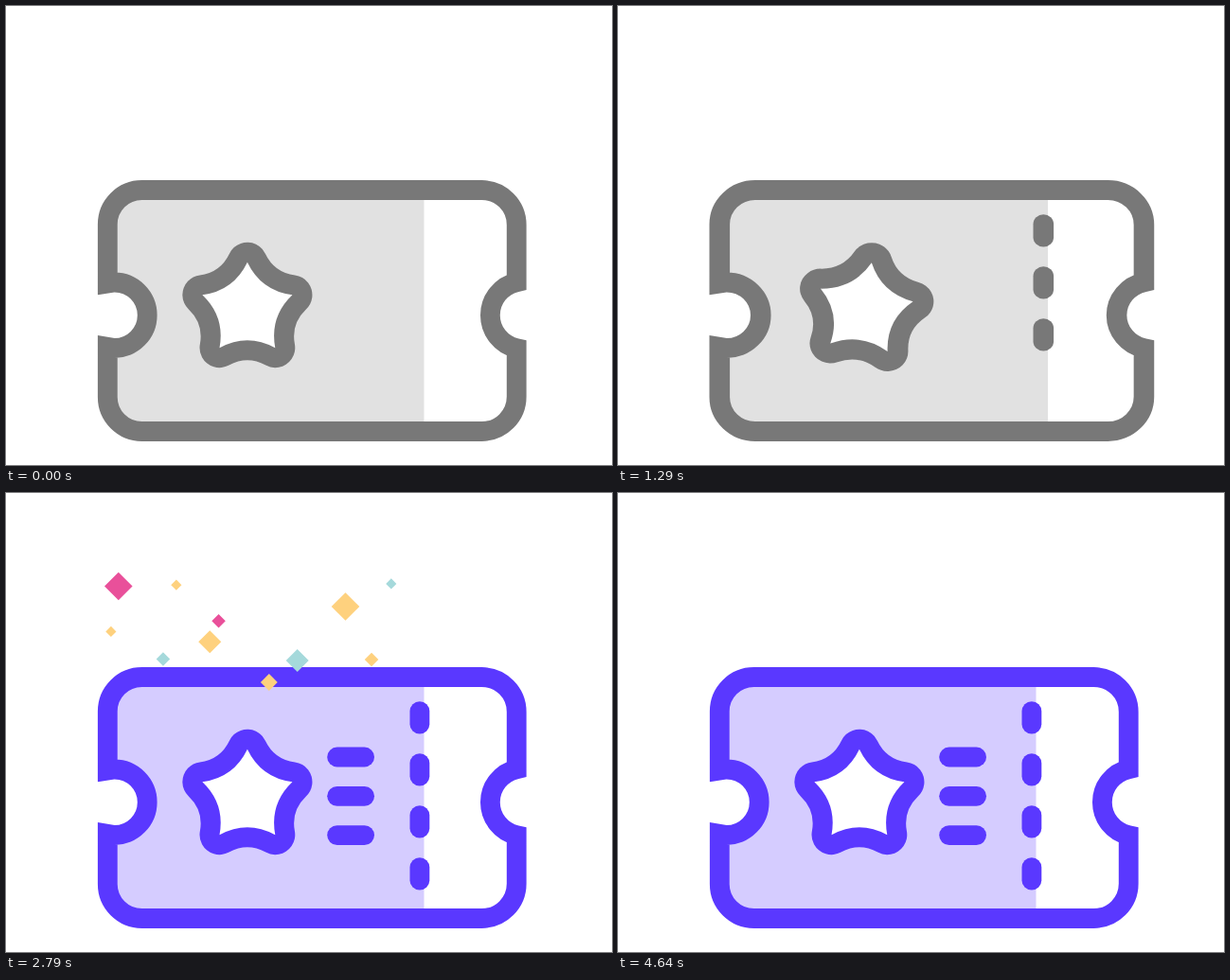
An HTML page for the animation above (4.78 s loop, 640 px wide and 485 px high).

```html
<!DOCTYPE html>
<html lang="en">
<head>
<meta charset="utf-8">
<title>Ticket</title>
<style>
  html, body { margin: 0; width: 100%; height: 100%; overflow: hidden; background: #fff; }
  svg { display: block; width: 100%; height: 100%; }
  .line { fill: none; stroke: var(--ink); stroke-width: 20.8; }
  .round { stroke-linecap: round; }
  .tint { fill: var(--tint); }
  .rim { fill: none; stroke: var(--ink); stroke-width: 42; stroke-linejoin: round; }
</style>
</head>
<body>
<svg viewBox="0 0 640 485">
  <defs>
    <clipPath id="stub"><rect x="90" y="180" width="351.5" height="290"/></clipPath>
    <path id="outline" d="M143.5 194.5H502.5A36.7 36.7 0 0 1 539.2 231.2V291.8A35.8 35.8 0 0 0 539.2 361.6V412.8A36.7 36.7 0 0 1 502.5 449.5H143.5A36.2 36.2 0 0 1 107.3 413.3V360.2L114.5 361.4A34.7 34.7 0 0 0 114.5 292L107.3 293.1V230.7A36.2 36.2 0 0 1 143.5 194.5Z"/>
  </defs>
  <g id="ticket">
    <use href="#outline" class="tint" clip-path="url(#stub)"/>
    <use href="#outline" class="line"/>
    <g id="star"><path class="rim"/><path fill="#fff"/></g>
    <g id="marks"></g>
  </g>
  <g id="confetti"></g>
</svg>
<script>
const LOOP = 4780, STEP = 500 / 7;
const $ = id => document.getElementById(id);
const clamp = x => Math.min(1, Math.max(0, x));
const span = (t, a, b) => clamp((t - a) / (b - a));
const sine = u => (1 - Math.cos(Math.PI * u)) / 2;
const mix = (a, b, u) => a + (b - a) * u;
const mixColor = (a, b, u) => `rgb(${a.map((c, i) => Math.round(mix(c, b[i], u)))})`;

function add(parent, attrs) {
  const el = document.createElementNS('http://www.w3.org/2000/svg', 'path');
  for (const key in attrs) el.setAttribute(key, attrs[key]);
  return parent.appendChild(el);
}

// Five sharp tips joined by concave sides, centred on the origin
function starPath() {
  const at = (r, deg) => {
    const a = deg * Math.PI / 180;
    return `${r * Math.sin(a)} ${-r * Math.cos(a)}`;
  };
  let d = 'M' + at(50, 0);
  for (let i = 0; i < 5; i++) d += `Q${at(24.5, i * 72 + 36)} ${at(50, i * 72 + 72)}`;
  return d + 'Z';
}
for (const part of $('star').children) part.setAttribute('d', starPath());

const marks = [];
function addMark(d, start) {
  marks.push({ el: add($('marks'), { d, class: 'line round' }), start });
}
for (let i = 0; i < 4; i++) addMark(`M436.9 ${230.6 + i * 55}v13.6`, 1130 + i * 70);
for (let i = 0; i < 3; i++) addMark(`M349.6 ${279 + i * 41.3}h29`, 1490 + i * 70);

const PINK = '#e9509a', GOLD = '#fed17e', TEAL = '#a5d9db';
// x, y, half size, way back x, way back y, colour
const confetti = [
  [48.5, 58, 26.5, 39, 22.5, PINK],
  [142, 40, 10, 21, 31.7, GOLD],
  [190, 96, 21.5, 14, 34, GOLD],
  [261.5, 55, 13, -20.5, 44.5, PINK],
  [394, 48.5, 26.5, -19.7, 39.7, GOLD],
  [473.5, 43.3, 10, -37, 29.2, TEAL],
  [50.5, 128.4, 10, 33.5, 10, GOLD],
  [129, 145.5, 13, 20.5, 16.7, TEAL],
  [258, 155, 16, 11, 25, GOLD],
  [336, 127, 21.5, -15.7, 27.7, TEAL],
  [436.5, 148, 13, -28, 15.5, GOLD]
].map(([x, y, r, dx, dy, fill]) =>
  ({ x, y, r, dx, dy, el: add($('confetti'), { d: 'M0-1L1 0L0 1L-1 0Z', fill }) }));

function stretch(t) {
  if (t < 640) return mix(1, 0.92, sine(t / 640));
  if (t < 1140) return mix(0.92, 1.078, sine(span(t, 640, 1140)));
  return 1 + 0.078 * Math.exp((1140 - t) / 200);
}

function turn(t) {
  if (t < 1140) return 377 * sine(span(t, 180, 1140));
  return 360 + 17 * Math.exp((1140 - t) / 200);
}

function burst(t) {
  return t < 3770
    ? 1 - (1 - span(t, 2510, 3750)) ** 3
    : 1 - span(t, 3793, 4575) ** 2;
}

function draw(t) {
  $('ticket').setAttribute('transform', `translate(107.3 0) scale(${stretch(t)} 1) translate(-107.3 0)`);
  $('star').setAttribute('transform', `translate(254.9 320.7) rotate(${turn(t)})`);
  for (const { el, start } of marks) el.style.display = t < start ? 'none' : '';

  const tone = span(t, 2320, 2720);
  const root = document.documentElement.style;
  root.setProperty('--ink', mixColor([120, 120, 120], [90, 56, 255], tone));
  root.setProperty('--tint', mixColor([225, 225, 225], [213, 204, 255], tone));

  const q = burst(t), back = 4.08 - 4.3 * q;
  $('confetti').style.display = q > 0 ? '' : 'none';
  for (const c of confetti) {
    const size = c.r * Math.max(0, 1 - 0.245 * back);
    c.el.setAttribute('transform', `translate(${c.x + c.dx * back} ${c.y + c.dy * back}) scale(${size})`);
  }
}

const begin = performance.now();
function tick() {
  const t = (performance.now() - begin) % LOOP;
  draw(t < 70 ? 0 : Math.floor((t + 5) / STEP) * STEP);
  requestAnimationFrame(tick);
}
tick();
</script>
</body>
</html>
```
